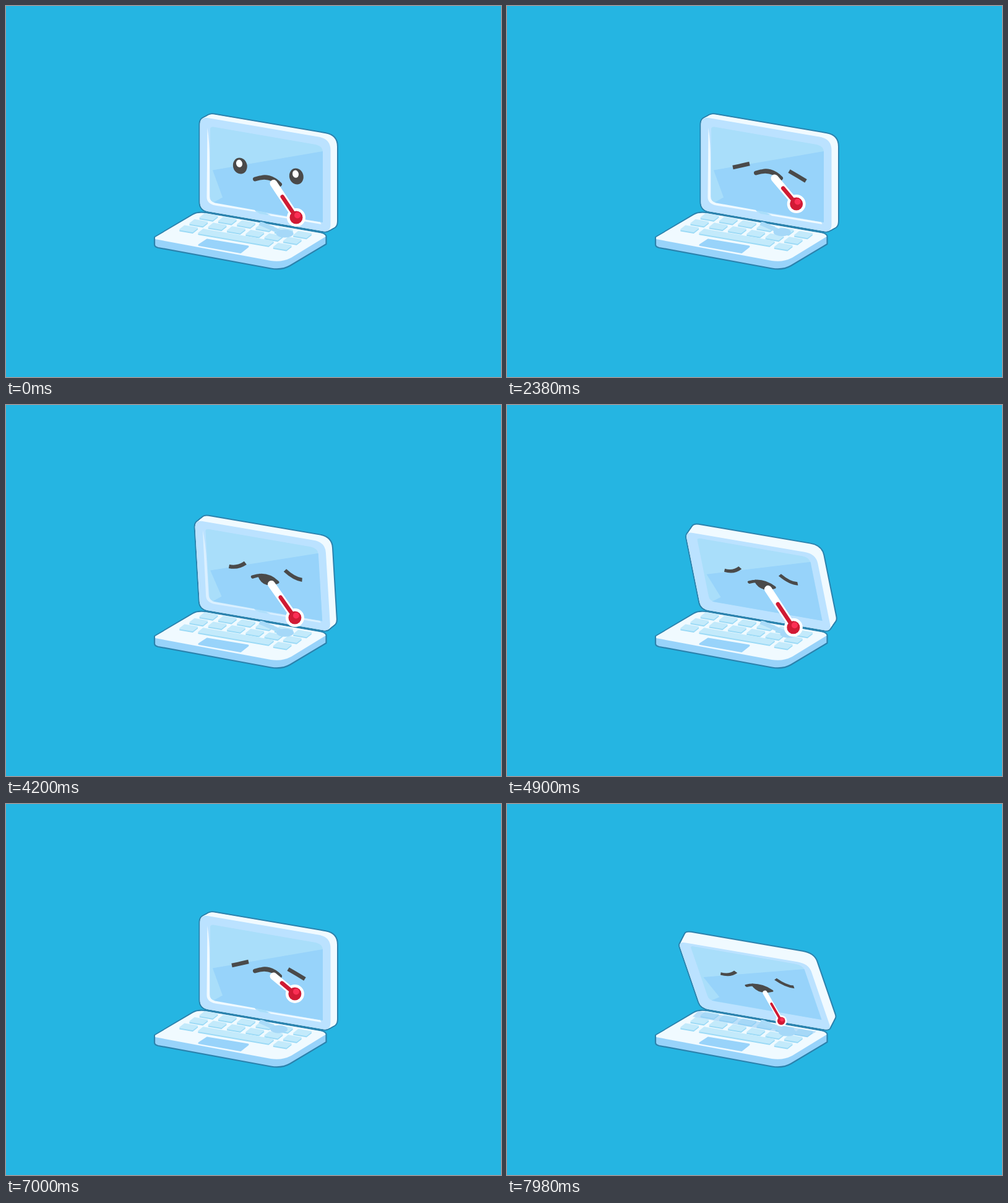
Recreate the animation shown at these times as an HTML page. Size 800 by 600 pixels, loop 8000 ms.

```html
<!DOCTYPE html>
<html lang="en">
<head>
<meta charset="utf-8">
<title>Poorly laptop</title>
<style>
  html, body { margin: 0; width: 100%; height: 100%; overflow: hidden; background: #25b5e2; }
  svg { display: block; width: 100%; height: 100%; }
  .outline { stroke: #2b82ad; stroke-width: 2.2; stroke-linejoin: round; vector-effect: non-scaling-stroke; }
  #shellOutline .outline { stroke-width: 4; }
  .ink { fill: none; stroke: #4a4a4a; }
</style>
</head>
<body>
<svg viewBox="0 0 800 600">
  <rect width="800" height="600" fill="#25b5e2"/>

  <g id="base">
    <path class="outline" fill="#98d3fa" d="M240 374 L302 337 Q309 332.500 322 334 L509 366.500 Q517.500 368.500 517.500 373 V385 L459 420 Q446 427.500 428 424.500 L246 391 Q240 389.500 240 386 Z"/>
    <path fill="#f0faff" d="M241 374 L302 338 Q309 333.500 322 335 L509 367.500 Q516.500 369.500 516.500 373 L461 407 Q446 415 428 412 L241 377 Z"/>
    <path fill="#98d3fa" stroke="#98d3fa" stroke-width="3" stroke-linejoin="round" d="M325 378 L391 389 L379 398.500 L312 386.500 Z"/>
    <g id="keys" stroke-linejoin="round" stroke-width="2"></g>
    <path id="lidShade" fill="#8fcaf5" d="M309 335 L500 368 L485 377 L300 344 Z"/>
    <path id="stemShade" stroke="#a9dbf8" stroke-width="7" fill="none"/>
    <ellipse id="bulbShade" rx="14" ry="6.500" fill="#a5d8f8"/>
  </g>

  <g id="shellOutline"></g>
  <g id="shell"></g>
  <path id="front" fill="#bbe2ff"/>

  <g id="screen">
    <path fill="#a9defa" d="M335 195.500 L500 224 Q512 226.500 512 237 V350 L340 320 Q330 318 330 309 V199 Q330 195 335 195.500 Z"/>
    <path fill="#97d3fa" d="M334 265.500 L512 235 V350 L334 318.500 L350 309.500 Z"/>
    <g id="gloss" fill="#f0faff">
      <path d="M325.500 197 Q329 220 329 250 V308 Q329 316 338 318.500 L402 330 L404 333 L338 322.500 Q324.500 319.500 324.500 309 Z"/>
      <path d="M418 335 L508 349.500 L509.500 353 L424 338.500 Z"/>
      <path fill="#a9defa" d="M403 331 L418 333.500 L428 339 L410 336 Z"/>
    </g>
  </g>

  <g id="face">
    <g id="openEyes"></g>
    <g id="shutEyes" class="ink" stroke-width="6.500">
      <path id="leftLid"/>
      <path id="rightLid"/>
    </g>
  </g>
  <path id="mouth" fill="#4a4a4a" stroke="#4a4a4a" stroke-linecap="round" stroke-linejoin="round"/>

  <g id="thermometer" stroke-linecap="round">
    <line id="glass" stroke="#fff"/>
    <circle id="ring" fill="#fff"/>
    <line id="mercury" stroke="#cf1a33"/>
    <circle id="bulb" fill="#d11a35"/>
    <circle id="shine" fill="#fb2f55"/>
  </g>
</svg>

<script>
const LOOP = 8000, STEP = 70;
const SLOPE = 0.172, HINGE_Y = 276.1, LID_HEIGHT = 151.5, SLICES = 12;
const MAX_YAWN = 0.69, WAKE = 2660;
const FRONT = 'M313.5 192 Q313.5 179 326 181 L506 211.8 Q524.5 215 524.5 233 V353 Q524.5 366 513 364.3 L327 332.3 Q313.5 330 313.5 317 Z';

const $ = id => document.getElementById(id);
const clamp = x => Math.max(0, Math.min(1, x));
const progress = (t, from, to) => clamp((t - from) / (to - from));
const smooth = x => x * x * (3 - 2 * x);
const mix = (a, b, u) => a + (b - a) * u;
const set = (id, attrs) => {
  for (const name in attrs) $(id).setAttribute(name, attrs[name]);
};

// A key is a parallelogram: `length` runs along the row, the depth is fixed.
function addKey(cx, cy, length) {
  const w = length / 2;
  const at = (along, depth) => `${cx + along * w - depth * 3.8},${cy + along * w * SLOPE + depth * 3}`;
  const points = [at(-1, -1), at(1, -1), at(1, 1), at(-1, 1)].join(' ');
  const layer = (dy, color) =>
    `<polygon points="${points}" transform="translate(0 ${dy})" fill="${color}" stroke="${color}"/>`;
  $('keys').innerHTML += layer(1.5, '#9bdaf6') + layer(-0.5, '#c3eafb');
}

function build() {
  for (let row = 0; row < 3; row++) {
    for (let col = 0; col < 6; col++) {
      if (row < 2 || col % 5 === 0) {
        addKey(327.5 - 16.2 * row + 30.3 * col, 341.5 + 9.6 * row + 5.7 * col, 20.5);
      }
    }
  }
  addKey(371.5, 374.5, 113);

  const slices = attrs => `<path d="${FRONT}" ${attrs}/>`.repeat(SLICES + 1);
  $('shellOutline').innerHTML = slices('class="outline" fill="#2b82ad"');
  $('shell').innerHTML = slices('fill="#f0faff"');
  set('front', { d: FRONT });

  $('openEyes').innerHTML = [[378.3, 258.5], [469.3, 275.5]].map(([x, y]) =>
    `<g data-x="${x}" data-y="${y}">
      <ellipse rx="11.3" ry="13.2" fill="#4a4a4a" transform="rotate(-15)"/>
      <ellipse cx="-.5" cy="-4" rx="5" ry="6.2" fill="#fff" transform="rotate(-12)"/>
    </g>`).join('');
}

// 0 is upright; the lid yawns forward and back once, then starts to fall shut.
function tiltAt(t) {
  const yawn = smooth(progress(t, 3710, 4970)) - smooth(progress(t, 5180, 6860));
  return MAX_YAWN * yawn + progress(t, 7263, 7980) ** 2;
}

// How far a cough throws the thermometer up.
function coughAt(t) {
  const begin = [6790, 3430, 1820, 770].find(s => t >= s);
  if (!begin || t >= 5180 && t < 6790) return 0;
  const swing = 28 + 7 * Math.sin(Math.PI * Math.min(t - begin, 630) / 420);
  return t < 3430 ? swing * (1 - progress(t, WAKE - STEP, WAKE + 2 * STEP)) : swing;
}

function lidMatrix(tilt) {
  const q = -37 * tilt / LID_HEIGHT;
  const k = (-LID_HEIGHT + 26 * tilt + 17.5 * tilt * tilt) / LID_HEIGHT;
  return [1 + SLOPE * q, SLOPE * (1 + k), -q, -k, HINGE_Y * q, HINGE_Y * (1 + k)];
}

const apply = ([a, b, c, d, e, f], x, y) => [a * x + c * y + e, b * x + d * y + f];

function drawLid(tilt, m) {
  const matrix = `matrix(${m})`;
  const raised = dy => `translate(0 ${dy * tilt}) ${matrix}`;
  for (const id of ['shellOutline', 'shell']) {
    [...$(id).children].forEach((slice, i) => {
      const u = i / SLICES;
      slice.setAttribute('transform',
        `translate(${(10.5 - 2 * tilt) * u} ${(-5.6 - 11 * tilt) * u}) ${matrix}`);
    });
  }
  set('front', { transform: matrix });
  set('screen', { transform: raised(-5) });
  set('gloss', { opacity: clamp(1 - tilt / 0.6) });
  set('face', { transform: raised(-7) });
  set('mouth', { transform: raised(-7) });
  set('lidShade', { opacity: 0.55 * progress(tilt, MAX_YAWN, 1) });
}

function drawFace(t, tilt, open, lift) {
  const shut = t >= 770 && t < WAKE || t >= 3430;
  set('openEyes', { visibility: shut ? 'hidden' : 'visible' });
  set('shutEyes', { visibility: shut ? 'visible' : 'hidden' });
  const stretch = t < 770 ? 1 : mix(0.5, 1, progress(t, WAKE, WAKE + 2 * STEP));
  for (const eye of $('openEyes').children) {
    eye.setAttribute('transform', `translate(${eye.dataset.x} ${eye.dataset.y}) scale(1 ${stretch})`);
  }
  const sag = 8 * clamp(tilt / 0.3), up = -0.35 * sag, down = 0.65 * sag;
  set('leftLid', { d: `M365 ${261 + up} Q379 ${258 + down} 392 ${255 + up}` });
  set('rightLid', { d: `M456 ${267 + up} Q470 ${275 + down} 483 ${283 + up}` });

  const y = 280 - 10 * lift - 5.5 * open + 8.5 * tilt;
  const lower = y + mix(-4, 13, open);
  set('mouth', {
    d: `M402.5 ${y} Q426 ${y - 8.5} 442.5 ${y + 8.5} C430 ${lower} 418 ${lower} 413.8 ${y - 2.7}`,
    'stroke-width': mix(7, 5.5, open)
  });
}

function drawThermometer(tilt, raise, lift, m) {
  const size = 1 - 0.39 * progress(tilt, MAX_YAWN, 1);
  const [tx, ty] = apply(m, 432.5, 287 - 8.5 * lift);
  const bx = mix(tx, 469 - 0.06 * raise - 9 * tilt, size);
  const by = mix(ty, 342 - raise + 38 * tilt * tilt, size);
  const end = { x2: bx, y2: by };
  set('glass', { x1: tx, y1: ty, ...end, 'stroke-width': 12 * size });
  set('mercury', { x1: mix(tx, bx, 0.39), y1: mix(ty, by, 0.39), ...end, 'stroke-width': 6.5 * size });
  set('ring', { cx: bx, cy: by, r: 15 * size });
  set('bulb', { cx: bx, cy: by, r: 10.5 * size });
  set('shine', { cx: bx + 2 * size, cy: by - 3.5 * size, r: 5 * size });

  const sx = 443 + (by - 314) * 0.27, sy = 365 + (by - 314) * 0.11;
  set('bulbShade', { cx: sx, cy: sy });
  set('stemShade', { d: `M410 351 L${sx - 6} ${sy - 2}` });
}

function draw(time) {
  const t = Math.floor(time % LOOP / STEP) * STEP;
  const tilt = tiltAt(t);
  const open = clamp(tilt / 0.2);
  const raise = coughAt(t) * (1 - open);
  const lift = clamp(raise / 20);
  const m = lidMatrix(tilt);
  drawLid(tilt, m);
  drawFace(t, tilt, open, lift);
  drawThermometer(tilt, raise, lift, m);
}

build();
const start = performance.now();
function frame() {
  draw(performance.now() - start);
  requestAnimationFrame(frame);
}
frame();
</script>
</body>
</html>
```
